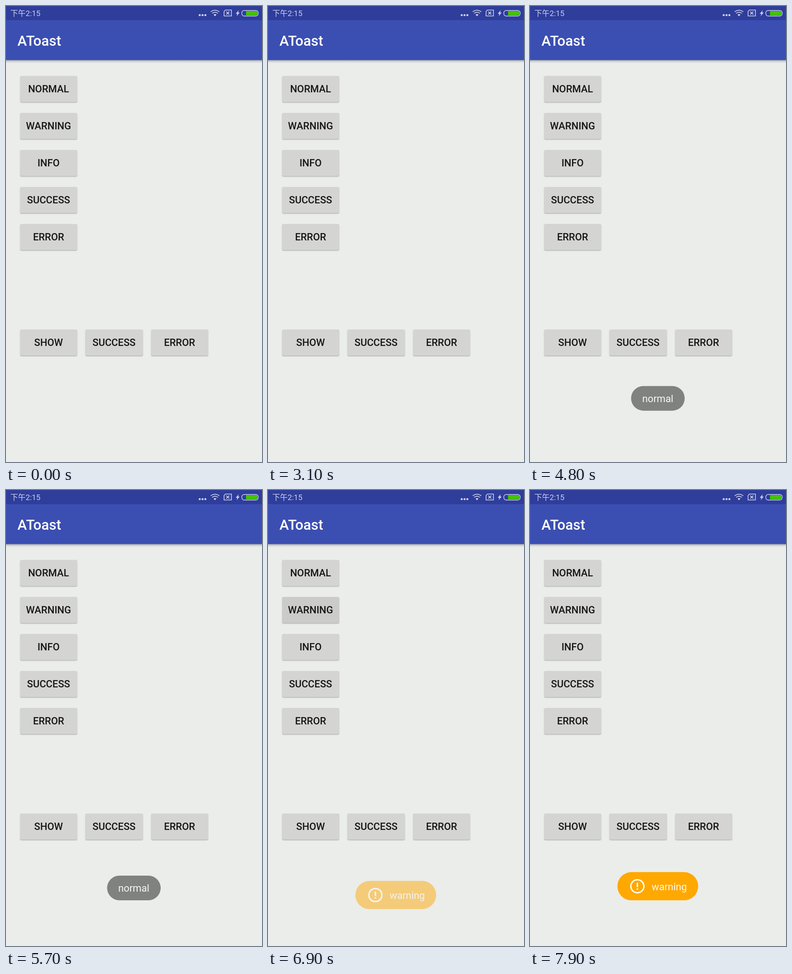
An HTML page for the animation above (8000 ms loop, 561 px wide and 998 px high).

```html
<!DOCTYPE html>
<html lang="en">
<head>
<meta charset="utf-8">
<title>Toast demo</title>
<style>
  html, body { margin: 0; width: 100%; height: 100%; overflow: hidden; background: #ebedea; }
  body { position: relative; font: 21.8px Roboto, "Noto Sans CJK SC", "Noto Sans CJK", sans-serif; }
  svg { position: absolute; left: 0; top: 0; }
  .button {
    position: absolute; width: 125.5px; height: 57px; border-radius: 3px;
    background-color: #d4d5d2; color: #151615;
    font-weight: 500; line-height: 58px; text-align: center; white-space: nowrap;
  }
</style>
</head>
<body>
<svg width="561" height="998" viewBox="0 0 561 998">
  <defs>
    <linearGradient id="shade" x2="0" y2="1">
      <stop offset="0" stop-color="#000" stop-opacity=".28"/>
      <stop offset=".5" stop-color="#000" stop-opacity=".1"/>
      <stop offset="1" stop-color="#000" stop-opacity="0"/>
    </linearGradient>
  </defs>
  <rect y="118.5" width="561" height="6.5" fill="url(#shade)"/>
  <rect y="30" width="561" height="88.5" fill="#3b4eb2"/>
  <rect width="561" height="31" fill="#2f3d9b"/>
  <text x="25" y="87" font-size="31.2" font-weight="500" fill="#fff">AToast</text>

  <g fill="#cdd1ec">
    <text x="9.5" y="22" font-size="16.8">下午2:15</text>
    <circle cx="424.5" cy="20" r="2.3"/>
    <circle cx="430.7" cy="20" r="2.3"/>
    <circle cx="436.9" cy="20" r="2.3"/>
    <path d="M510 9L503.500 17H507L505.500 22.500L512 14.300H508.500Z"/>
    <path d="M458 22.500L454.800 18.800Q458 16.500 461.200 18.800Z"/>
  </g>
  <g fill="none" stroke="#cdd1ec" stroke-width="1.8">
    <path d="M448.500 12.600Q458 5.600 467.500 12.600M451.600 16.100Q458 11.300 464.400 16.100"/>
    <path d="M481 8.800H494V21.700H477.800V12Z" stroke-width="1.6"/>
    <path d="M482.700 12.300L489.300 18.700M489.300 12.300L482.700 18.700"/>
    <rect x="516.700" y="9.700" width="36" height="12.300" rx="5.500" stroke-width="1.4"/>
  </g>
  <path d="M526 11.300H548Q551.300 11.300 551.300 15.800T548 20.400H526Z" fill="#45c300"/>

  <g id="normalToast">
    <rect x="221.500" y="844" width="117.500" height="54" rx="27" fill="#80827f"/>
    <text x="280" y="879" text-anchor="middle" fill="#f7f7f7">normal</text>
  </g>
  <g id="warningToast">
    <rect x="191.500" y="836.300" width="177" height="61.700" rx="30.800" fill="#ffa800"/>
    <circle cx="235.300" cy="867.200" r="14.300" fill="none" stroke="#fff" stroke-width="3"/>
    <path d="M235.300 859.500V869.200M235.300 872V875" stroke="#fff" stroke-width="3.100"/>
    <text x="266.500" y="875.500" fill="#fff9ec">warning</text>
  </g>
</svg>
<script>
const LOOP = 8000, STEP = 100;
const clamp = v => Math.max(0, Math.min(1, v));
const byId = id => document.getElementById(id);

function addButton(label, x, y) {
  const el = document.createElement("div");
  el.className = "button";
  el.textContent = label;
  el.style.left = x + "px";
  el.style.top = y + "px";
  document.body.append(el);
  press(el, -1);
  return el;
}

// Ripple, tint and lifted shadow; age is the time since the touch.
function press(el, age, x = 0, y = 0) {
  const active = age >= 0;
  const fade = active ? 1 - clamp((age - 180) / 190) : 0;
  const radius = 20 + 7 * (Math.max(0, age) / 35) ** 1.6;
  const lift = active ? clamp(age / 35) * (1 - clamp((age - 100) / 65)) : 0;
  const ripple = `rgba(0,0,0,${0.052 * fade})`;
  const tint = `rgba(0,0,0,${0.014 * fade})`;
  el.style.backgroundImage = active
    ? `radial-gradient(circle at ${x}px ${y}px, ${ripple} ${radius}px, transparent ${radius + 0.7}px),
       linear-gradient(${tint}, ${tint})`
    : "none";
  el.style.boxShadow =
    `0 ${1.4 + 1.6 * lift}px ${2 + 3 * lift}px rgba(0,0,0,${0.25 + 0.07 * lift})`;
}

function overshoot(t) {
  const u = t - 1;
  return u * u * (4 * u + 3) + 1;
}

function toast(el, age, height, stay = Infinity) {
  const dy = height * (1 - overshoot(clamp(age / 500)));
  el.setAttribute("transform", `translate(0 ${dy})`);
  el.setAttribute("opacity", clamp(age / 150) * (1 - clamp((age - stay) / 150)));
}

const [normal, warning] = ["NORMAL", "WARNING", "INFO", "SUCCESS", "ERROR"]
  .map((label, i) => addButton(label, 30.5, 152.5 + 81.1 * i));
["SHOW", "SUCCESS", "ERROR"].forEach((label, i) => addButton(label, 30.5 + 143.5 * i, 708.3));

function draw() {
  const t = Math.floor(performance.now() % LOOP / STEP) * STEP;
  press(normal, t - 4430, 74, 38);
  press(warning, t - 6665, 74.5, 39);
  toast(byId("normalToast"), t - 4590, 54, 1986);
  toast(byId("warningToast"), t - 6828, 62);
  requestAnimationFrame(draw);
}
draw();
</script>
</body>
</html>
```
